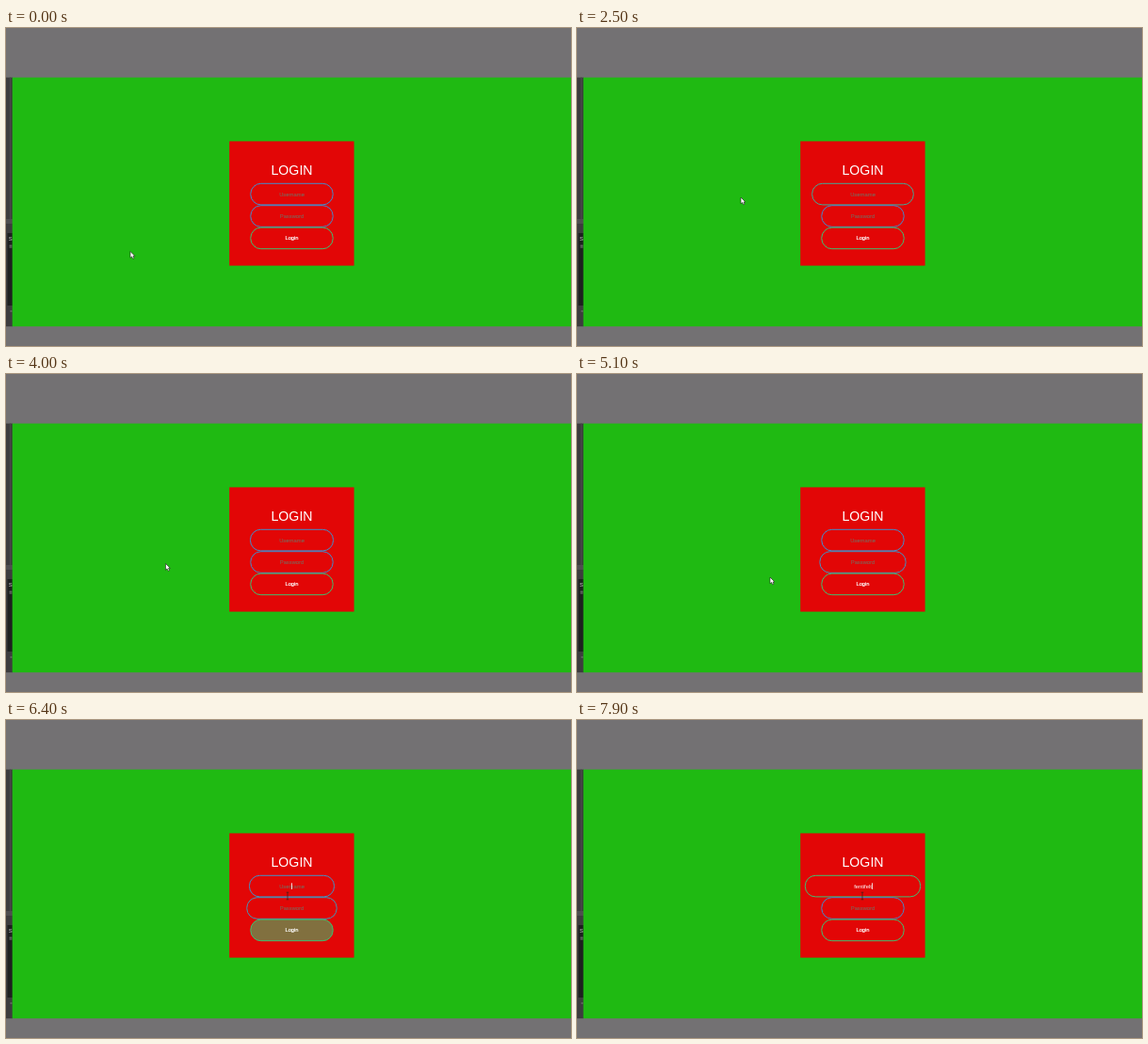
An HTML page for the animation above (8 s loop, 600 by 338 pixels).

```html
<!DOCTYPE html>
<html lang="en">
<head>
<meta charset="utf-8">
<title>Login form</title>
<style>
  html, body { margin: 0; width: 100%; height: 100%; overflow: hidden; background: #737173; }
  svg { display: block; width: 600px; height: 338px; }
  text { font-family: "Liberation Sans", Arial, sans-serif; font-size: 5.8px; fill: #fff; }
  .mid { text-anchor: middle; }
  .hint { fill: #8b5a50; stroke: #8b5a50; stroke-width: .15; }
  .side { font-size: 6px; fill: #c8c8c8; }
</style>
</head>
<body>
<svg viewBox="0 0 600 338">
  <rect width="600" height="338" fill="#737173"/>
  <g>
    <rect y="52.6" width="7" height="264.6" fill="#3d3c3e"/>
    <rect x="4" y="52.6" width="1" height="151" fill="#4b4a4c"/>
    <rect y="203" width="7" height="5" fill="#4f4e50"/>
    <rect x="1.5" y="218" width="5.5" height="77" fill="#1e2020"/>
    <text class="side" x="2.8" y="226">S</text>
    <path d="M3.5 231.2h3M3.5 233h3M4.5 301h2" stroke="#999" stroke-width=".8"/>
  </g>
  <rect x="6.7" y="52.6" width="593.3" height="264.6" fill="#1fba12"/>
  <rect x="237.2" y="120.4" width="132.4" height="132.2" fill="#e20606"/>
  <text class="mid" x="303.5" y="156.1" style="font-size:14.2px">LOGIN</text>
  <g fill="none" stroke-width="1">
    <rect id="user" y="165.3" height="22.6" rx="11"/>
    <rect id="pass" y="188.7" height="22.6" rx="11"/>
    <rect id="button" x="259.8" y="212.1" width="87.4" height="22.6" rx="11" stroke="#3fc070" fill="#2ecc71"/>
  </g>
  <text id="userHint" class="mid hint" x="303.5" y="178.6">Username</text>
  <text id="typed" class="mid" x="303.5" y="178.6"></text>
  <text class="mid hint" x="303.5" y="202">Password</text>
  <text class="mid" x="303.5" y="225.3" stroke="#fff" stroke-width=".2">Login</text>
  <rect id="caret" width=".9" height="6.6" fill="#f4eeee"/>
  <path id="arrow" d="M0 0V6.8L1.6 5.4L2.7 7.8L4 7.2L3 4.9H4.9Z" fill="#fff" stroke="#222" stroke-width=".6"/>
  <path id="beam" d="M-1.3 -3.8H1.3M0 -3.8V3.8M-1.3 3.8H1.3" fill="none" stroke="#4c1a18" stroke-width=".8"/>
</svg>
<script>
const LOOP = 8000, STEP = 100, FADE = 400, MOVE = 250, MID = 303.5;
const NAME = "fentifelt";
const $ = id => document.getElementById(id);
const clamp = v => Math.min(1, Math.max(0, v));
const mix = (a, b, k) => a + (b - a) * k;
const smooth = k => k * k * (3 - 2 * k);

// [start, end] of each state
const userFocus = [[1750, 2430], [3000, 3680], [6390, LOOP]];
const passFocus = [[4300, 4870], [5300, 6230]];
const hover = [[5500, 6320]];

// pointer stops: arrival time, x, y
const stops = [
  [0, 132, 237.5], [250, 335, 162], [400, 311, 241], [900, 196, 270],
  [1400, 144, 235], [1600, 260, 156], [1900, 308, 180], [2300, 174, 180],
  [2900, 318, 177], [3800, 169.5, 201.5], [4300, 300, 204], [4900, 205, 216],
  [5350, 305, 206], [5600, 310, 222], [6400, 299, 187], [6900, 357, 226], [7300, 303, 187]
];

// close to CSS "ease"
const ease = x => 1 - (1 - smooth(Math.sqrt(clamp(x)))) ** 1.15;

const level = (spans, t) => spans.reduce(
  (sum, [a, b]) => sum + ease((t - a) / FADE) - ease((t - b) / FADE), 0);

const active = (spans, t) => spans.find(([a, b]) => t >= a && t < b);

// rest at each stop, then move to arrive at the next one on time
function pointer(t) {
  let [, x, y] = stops[0];
  for (const [end, nx, ny] of stops) {
    const k = smooth(clamp((t - end) / MOVE + 1));
    x = mix(x, nx, k);
    y = mix(y, ny, k);
  }
  return [x, y];
}

function drawField(el, k) {
  const half = mix(43.7, 61.2, k);
  el.setAttribute("x", MID - half);
  el.setAttribute("width", 2 * half);
  el.setAttribute("stroke", `rgb(${mix(66, 63, k)},${mix(140, 192, k)},${mix(205, 112, k)})`);
  return half;
}

function drawCaret(t, count) {
  const inUser = active(userFocus, t), span = inUser || active(passFocus, t);
  const on = span && (count > 0 || (t - span[0]) % 900 < 450);
  const end = count ? $("typed").getComputedTextLength() / 2 + .2 : -.4;
  $("caret").setAttribute("x", MID + end);
  $("caret").setAttribute("y", inUser ? 173.3 : 196.7);
  $("caret").style.display = on ? "" : "none";
}

function render(t) {
  const userHalf = drawField($("user"), level(userFocus, t));
  const passHalf = drawField($("pass"), level(passFocus, t));
  $("button").setAttribute("fill-opacity", clamp(level(hover, t)));

  const count = t < 7500 ? 0 : Math.min(NAME.length, 2 * ((t - 7500) / STEP + 1));
  $("typed").textContent = NAME.slice(0, count);
  $("userHint").style.display = count ? "none" : "";
  drawCaret(t, count);

  const [x, y] = pointer(t), dx = Math.abs(x - MID);
  const inField = y > 165 && y < 188 && dx < userHalf || y > 188.5 && y < 211.5 && dx < passHalf;
  for (const id of ["arrow", "beam"]) {
    $(id).setAttribute("transform", `translate(${x} ${y})`);
    $(id).style.display = (id === "beam") === inField ? "" : "none";
  }
}

const start = performance.now();
function tick() {
  const t = (performance.now() - start) % LOOP;
  render(Math.floor(t / STEP) * STEP);
  requestAnimationFrame(tick);
}
tick();
</script>
</body>
</html>
```
